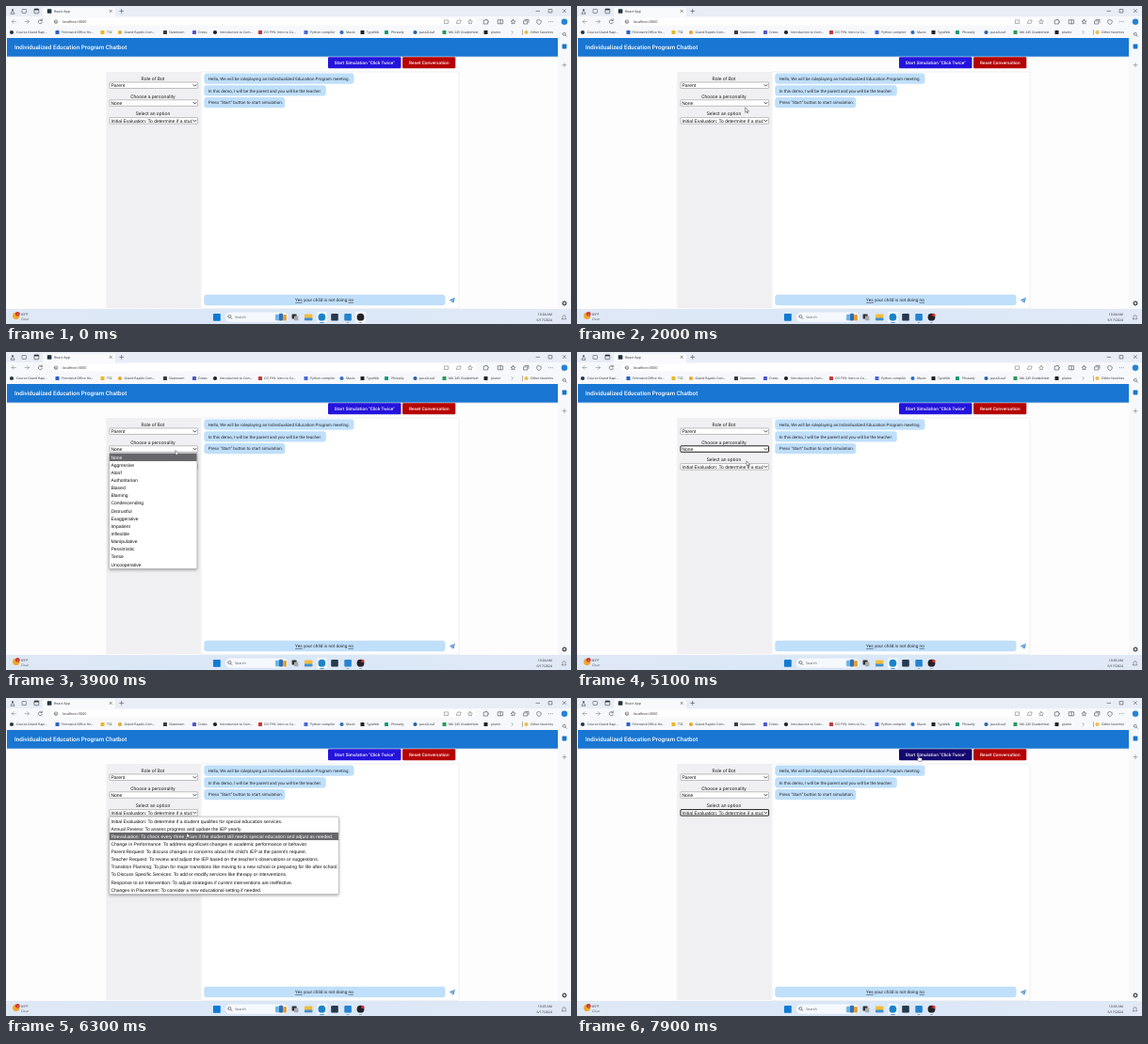
An HTML page that plays this animation: 600 by 338 pixels, repeating every 8 s.

```html
<!DOCTYPE html>
<html lang="en">
<head>
<meta charset="utf-8">
<title>Chatbot demo</title>
<style>
html, body { margin: 0; width: 100%; height: 100%; overflow: hidden; background: #fdfdfe; }
svg { display: block; width: 100vw; height: 100vh; }
text { text-rendering: geometricPrecision; white-space: pre; }
.ui { font-family: "Open Sans", "Noto Sans", sans-serif; fill: #2b2b2e; }
.app { font-family: Roboto, Arial, sans-serif; letter-spacing: .00938em; fill: #222; }
.bold { font-family: Roboto, Arial, sans-serif; font-weight: 500; letter-spacing: .0075em; fill: #fff; }
.btn { letter-spacing: .02em; }
.form { font-family: "Liberation Sans", Arial, sans-serif; fill: #111; }
.line { fill: none; stroke: #4a4a4e; stroke-width: .6; stroke-linecap: round; stroke-linejoin: round; }
.on { fill: #fff; }
</style>
</head>
<body>
<svg id="stage" viewBox="0 0 600 338" xmlns="http://www.w3.org/2000/svg">
<defs>
  <linearGradient id="bar"><stop offset="0" stop-color="#dfe8f5"/><stop offset=".5" stop-color="#d9e7f8"/><stop offset="1" stop-color="#e1e9f6"/></linearGradient>
  <filter id="soft" x="-10%" y="-10%" width="120%" height="125%"><feDropShadow dx="0" dy="1.2" stdDeviation="1.4" flood-opacity=".35"/></filter>
  <clipPath id="clip"><rect x="110" y="75" width="87.5" height="60"/></clipPath>
</defs>
<g id="page"></g>
<g id="people"></g>
<g id="options"></g>
<g id="arrow"><path d="M0 0V5.4L1.3 4.2L2.2 6.2L3 5.8L2.1 3.9H3.8Z" fill="#fff" stroke="#222" stroke-width=".45"/></g>
<g id="hand"><path d="M0 .5Q.6-.3 1.1.5V2.5L3.7 3Q4.3 3.2 4.1 4.2L3.5 6.4H.7L-1.2 4Q-1 3.2 0 3.8Z" fill="#fff" stroke="#222" stroke-width=".4"/></g>
</svg>
<script>
const $ = id => document.getElementById(id);
const esc = s => s.replace(/&/g, '&amp;').replace(/</g, '&lt;');
const rect = (x, y, w, h, fill, r = 0, more = '') =>
  `<rect x="${x}" y="${y}" width="${w}" height="${h}" fill="${fill}" rx="${r}" ${more}/>`;
const dot = (x, y, r, fill) => `<circle cx="${x}" cy="${y}" r="${r}" fill="${fill}"/>`;
const line = (d, more = '') => `<path class="line" d="${d}" ${more}/>`;
const text = (x, y, size, cls, s, more = '') =>
  `<text x="${x}" y="${y}" font-size="${size}" class="${cls}" ${more}>${esc(s)}</text>`;
const mid = 'text-anchor="middle"';

function browser() {
  let s = rect(0, 0, 600, 11, '#e8edf6') + rect(0, 11, 600, 311, '#f7f8fb');
  // tab strip
  s += rect(39, 1.5, 77, 11, '#f9fafc', 2);
  s += dot(7, 4.3, 1.1, '#55585e') + line('M5 8Q5 5.9 7 5.9T9 8Z');
  s += rect(17, 3.5, 4.5, 4, 'none', .6, 'stroke="#55585e" stroke-width=".6"');
  s += rect(30, 3, 4.8, 4.8, 'none', .6, 'stroke="#333" stroke-width=".6"') + rect(30, 3, 4.8, 1.6, '#333', .5);
  s += rect(43.8, 3.2, 4.6, 4.6, '#20343c', .5);
  s += text(51, 6.9, 3.6, 'ui', 'React App');
  s += line('M110 4.2l2.4 2.4m0-2.4l-2.4 2.4M122.7 3.4v4M120.7 5.4h4');
  s += line('M563 5.4h3.6M576.5 3.6h3.4v3.4h-3.4zM591.3 3.6l3.2 3.2m0-3.2l-3.2 3.2');
  // address row
  s += line('M10.4 16.6H6.2m1.8-1.8L6.2 16.6l1.8 1.8M20.2 16.6h4.2m-1.8-1.8l1.8 1.8l-1.8 1.8', 'opacity=".65"');
  s += line('M38 15.3A2.1 2.1 0 1 0 38.4 17.3M38.3 14v1.6h-1.6');
  s += rect(47, 12.8, 452, 7.8, '#fff', 3.6);
  s += dot(53, 16.7, 1.8, 'none') + line('M51.2 16.7a1.8 1.8 0 1 0 3.6 0a1.8 1.8 0 1 0-3.6 0M53 16.4v1.2');
  s += text(60, 18, 3.75, 'ui', 'localhost:3000');
  s += line('M465.8 14.9h3.8v3.6h-3.8zM478.6 18.4h3.6l1-3.4h-3.2zM493 14.4l.7 1.5l1.7.2l-1.2 1.2l.3 1.7l-1.5-.8l-1.5.8l.3-1.7l-1.2-1.2l1.7-.2z', 'opacity=".7"');
  s += line('M507.6 15h2v-.8h1v.8h1v1.2h.8v1h-.8V19h-4zM522.6 14.8h5v4h-5zM525.1 14.8v4M538.5 14.4l.7 1.5l1.7.2l-1.2 1.2l.3 1.7l-1.5-.8l-1.5.8l.3-1.7l-1.2-1.2l1.7-.2z');
  s += line('M550 15.8h3.8v3.2H550zM551 14.4h4v3M566 14.6l2.2 1v2q-.6 1.4-2.2 2q-1.6-.6-2.2-2v-2z');
  s += [576.6, 578.4, 580.2].map(x => dot(x, 16.7, .45, '#444')).join('');
  s += dot(593, 16.7, 3.2, '#2583d8');
  // bookmarks: icon x, label x, colour, label
  const marks = [
    [6, 11, '#26324a', 'Course Grand Rapi...'], [54.5, 59, '#2c62c9', 'Ferrowick Office Ho...'],
    [102.5, 107, '#e9b829', 'TSC'], [121, 125.5, '#e4a92a', 'Grand Rapids Com...'],
    [169, 173, '#3b3b3b', 'Slateroom'], [200, 204, '#5059c9', 'Crews'],
    [222, 227, '#1d1f23', 'Introduction to Com...'], [270, 274, '#c33a3a', 'CIS FYN: Intro to Co...'],
    [318.5, 323, '#4867d8', 'Python compiler'], [356.5, 361, '#2d6fc4', 'Mavio'],
    [378.5, 383, '#222', 'TypeNib'], [404, 409, '#169b77', 'Phrasely'],
    [434.5, 439, '#2c60a8', 'pass2Leaf'], [465.5, 470, '#2a9b57', 'MA 245 Gradesheet'],
    [509.5, 515, '#222', 'plume'], [552.5, 557, '#edbd45', 'Other favorites']];
  marks.forEach(([x, tx, c, label], i) => {
    s += (i % 3 ? rect(x - 2, 26, 4, 4, c, .5) : dot(x, 28, 2.1, c)) + text(tx, 29.3, 3.45, 'ui', label);
  });
  s += line('M537 26.5l1.5 1.5l-1.5 1.5M548.5 25.5v5', 'opacity=".7"');
  // side rail
  s += line('M591.3 29.8a1.5 1.5 0 1 0 3 0a1.5 1.5 0 1 0-3 0M594 31l1.3 1.3');
  s += rect(590.6, 40.6, 4.8, 4.8, '#1976c8', .6) + line('M593 60.7v4M591 62.7h4', 'opacity=".7"');
  s += line('M591.2 316a1.8 1.8 0 1 0 3.6 0a1.8 1.8 0 1 0-3.6 0', 'stroke-dasharray=".9 .4" style="stroke-width:1.3"') + dot(593, 316, .6, '#777');
  return s;
}

function select(y, label, value, id = '') {
  return text(156, y - 2.3, 5, 'app', label, mid) +
    rect(110, y, 93.6, 6.5, '#fff', .6, `stroke="#777" stroke-width=".45" ${id && `id="${id}"`}`) +
    text(111.4, y + 5, 5, 'form', value, 'clip-path="url(#clip)"') +
    line(`M199 ${y + 2.6}l1.5 1.6l1.5-1.6`, 'style="stroke:#111;stroke-width:.75"');
}

function content() {
  let s = rect(1, 34, 585, 288, '#fdfdfe') + rect(1, 53, 585, 1.4, '#9db4cc', 0, 'opacity=".55"');
  s += rect(1, 34, 585, 19.6, '#1976d2') + text(9, 46, 6.25, 'bold', 'Individualized Education Program Chatbot');
  s += rect(342, 54.2, 77.5, 12, '#2413dc', 1.2, 'id="start"') + rect(421, 54.2, 56.3, 12, '#b50303', 1.2);
  s += text(380.8, 62, 4.65, 'bold btn', 'Start Simulation "Click Twice"', mid);
  s += text(449.3, 62, 4.7, 'bold btn', 'Reset Conversation', mid);
  s += rect(106.3, 70, 100, 251.3, '#f0eff1') + rect(207, 70, 274, 251.3, '#fff', .6, 'stroke="#dcdde2" stroke-width=".5"');
  s += select(81, 'Role of Bot', 'Parent') + select(99.8, 'Choose a personality', 'None', 'sel1') +
    select(118.6, 'Select an option', 'Initial Evaluation: To determine if a student', 'sel2');
  [['Hello, We will be roleplaying an Individualized Education Program meeting.', 159.2],
   ['In this demo, I will be the parent and you will be the teacher.', 129.5],
   ['Press "Start" button to start simulation.', 86]].forEach(([t, w], i) => {
    const y = 71.6 + i * 12.75;
    s += rect(210.3, y, w, 11.2, '#bfdffa', 3) + text(214.8, y + 7.3, 4.48, 'app', t);
  });
  s += rect(210.3, 306.8, 256.2, 11.5, '#bfdffa', 3);
  s += `<text x="338" y="314.2" font-size="4.68" class="app" ${mid}><tspan text-decoration="underline">Yes</tspan> your child is not doing <tspan text-decoration="underline">no</tspan></text>`;
  s += '<path d="M470.8 312.6L477 309.8L475.3 315.8L473.7 314.2L472.8 315.3V313.4Z" fill="#4b8fd4"/><path d="M472.8 313.4L477 309.8L473.7 314.2" fill="#a5cbef"/>';
  return s;
}

function taskbar() {
  let s = rect(0, 322, 600, 16, 'url(#bar)');
  s += dot(10.7, 329.3, 3.6, '#f0a52d') + dot(12.3, 327.3, 2.4, '#c93a2a') + text(12.3, 328.5, 3, 'ui on', '1', mid + ' style="fill:#fff"');
  s += text(16, 329, 3.5, 'ui', '83°F') + text(16, 334.4, 3.4, 'ui', 'Clear', 'opacity=".75"');
  s += rect(220, 327, 7.8, 7.8, '#0f7bd3', .8);
  s += rect(232.5, 325.2, 67.5, 10.8, '#f5f9fe', 5.4, 'stroke="#d3dcea" stroke-width=".4"');
  s += line('M235.8 330a1.6 1.6 0 1 0 3.2 0a1.6 1.6 0 1 0-3.2 0M238.6 331.2l1.4 1.4') + text(243, 332.1, 3.8, 'ui', 'Search', 'opacity=".75"');
  s += rect(286, 327.8, 6, 6.4, '#6fb4e8', 1) + rect(290, 326.8, 4, 7.6, '#2f6fb5', 1) + rect(294, 328, 4, 6.4, '#e3a03c', 1);
  s += rect(303.6, 327.6, 5, 5, '#333', .5) + rect(306, 329.6, 4.4, 4.6, '#aaa', .5);
  s += rect(317, 327.4, 8.4, 6.8, '#f3bd3a', .8) + rect(317, 331.5, 8.4, 2.7, '#3d8fd8', .6);
  s += rect(330, 325, 11, 11.6, '#eff5fc', 1.5) + dot(335.4, 330.7, 3.9, '#1b84c6');
  s += rect(345.2, 327, 7.6, 7.4, '#263a4c', 1) + rect(359.3, 327, 7.6, 7.6, '#2484cf', 1);
  s += rect(371, 324.8, 11.2, 12, '#f2f6fc', 1.5, 'id="tile"') + dot(376.5, 330.7, 3.9, '#242228');
  s += `<g id="rec">${dot(378.8, 328.4, 1.7, '#d92c2c')}</g>`;
  s += rect(333.2, 336.2, 4.6, .7, '#2478c8', .3) + rect(361.7, 336.2, 2.6, .7, '#888', .3) + rect(375, 336.2, 2.8, .7, '#888', .3);
  s += text(580, 329, 3.5, 'ui', '10:04 AM', 'text-anchor="end" id="clock"') + text(580, 334.6, 3.5, 'ui', '6/17/2024', 'text-anchor="end"');
  s += line('M590.4 332.8h4.4l-.6-1v-1.6a1.6 1.6 0 0 0-3.2 0v1.6z', 'opacity=".8"');
  return s;
}

const STEP = 8.13;
function popup(id, y, w, items) {
  const h = items.length * STEP + 1;
  $(id).innerHTML = rect(109.7, y, w, h, '#fff', .8, 'stroke="#8b8b8f" stroke-width=".45" filter="url(#soft)"') +
    items.map((t, i) => `<g>${rect(110, y + .5 + i * STEP, w - .6, STEP, 'none')}${text(111.4, y + 6.3 + i * STEP, 5, 'form', t)}</g>`).join('');
}
function mark(id, row) {
  $(id).querySelectorAll('g').forEach((g, i) => {
    g.firstChild.setAttribute('fill', i === row ? '#67676b' : 'none');
    g.lastChild.style.fill = i === row ? '#fff' : '';
  });
}

$('page').innerHTML = browser() + content() + taskbar();
popup('people', 107.4, 93.2, ['None', 'Aggressive', 'Aloof', 'Authoritarian', 'Biased', 'Blaming', 'Condescending',
  'Distrustful', 'Exaggerative', 'Impatient', 'Inflexible', 'Manipulative', 'Pessimistic', 'Tense', 'Uncooperative']);
popup('options', 126.2, 243.6, [
  'Initial Evaluation: To determine if a student qualifies for special education services.',
  'Annual Review: To assess progress and update the IEP yearly.',
  'Reevaluation: To check every three years if the student still needs special education and adjust as needed.',
  'Change in Performance: To address significant changes in academic performance or behavior.',
  "Parent Request: To discuss changes or concerns about the child's IEP at the parent's request.",
  "Teacher Request: To review and adjust the IEP based on the teacher's observations or suggestions.",
  'Transition Planning: To plan for major transitions like moving to a new school or preparing for life after school.',
  'To Discuss Specific Services: To add or modify services like therapy or interventions.',
  'Response to an Intervention: To adjust strategies if current interventions are ineffective.',
  'Changes in Placement: To consider a new educational setting if needed.']);

// pointer path: time, x, y
const path = [[0, 377, 332], [500, 371, 326], [1300, 275, 215], [1800, 190, 150], [2000, 178.7, 107.8], [2700, 179.5, 106],
  [3600, 180, 104.6], [4500, 180, 104.6], [4900, 180, 115.8], [5100, 180, 115.8], [5300, 181, 120.5], [5800, 187.5, 177.5],
  [6000, 188, 180], [6500, 194.5, 119], [6900, 194.5, 118.6], [7600, 361.5, 60.5], [7800, 361.5, 60.5], [7900, 362.3, 61]];

function pointer(t) {
  const i = path.findIndex(p => p[0] > t);
  if (i < 0) return path[path.length - 1].slice(1);
  const [a, b] = [path[i - 1], path[i]], k = (t - a[0]) / (b[0] - a[0]);
  return [a[1] + (b[1] - a[1]) * k, a[2] + (b[2] - a[2]) * k];
}
const show = (id, on) => $(id).style.display = on ? '' : 'none';
function focus(id, on) {
  $(id).setAttribute('stroke', on ? '#111' : '#777');
  $(id).setAttribute('stroke-width', on ? .95 : .45);
}

function draw(now) {
  const t = Math.floor(now % 8000 / 100) * 100, [x, y] = pointer(t);
  const onStart = t > 7000 && x > 342 && y < 66.2;
  for (const id of ['arrow', 'hand']) $(id).setAttribute('transform', `translate(${x} ${y})`);
  show('arrow', t >= 100 && !onStart);
  show('hand', onStart);
  show('people', t >= 3700 && t < 4500);
  show('options', t >= 5300 && t < 6500);
  mark('people', 0);
  mark('options', Math.max(0, Math.floor((y - 126.7) / STEP)));
  focus('sel1', t >= 4500 && t < 5300);
  focus('sel2', t >= 6500);
  show('rec', t >= 200);
  show('tile', t < 700);
  $('start').setAttribute('fill', onStart ? '#14076f' : '#2413dc');
  $('clock').textContent = t < 4700 ? '10:04 AM' : '10:05 AM';
}
let begin;
function tick(now) {
  begin ??= now;
  draw(now - begin);
  requestAnimationFrame(tick);
}
draw(0);
requestAnimationFrame(tick);
</script>
</body>
</html>
```
